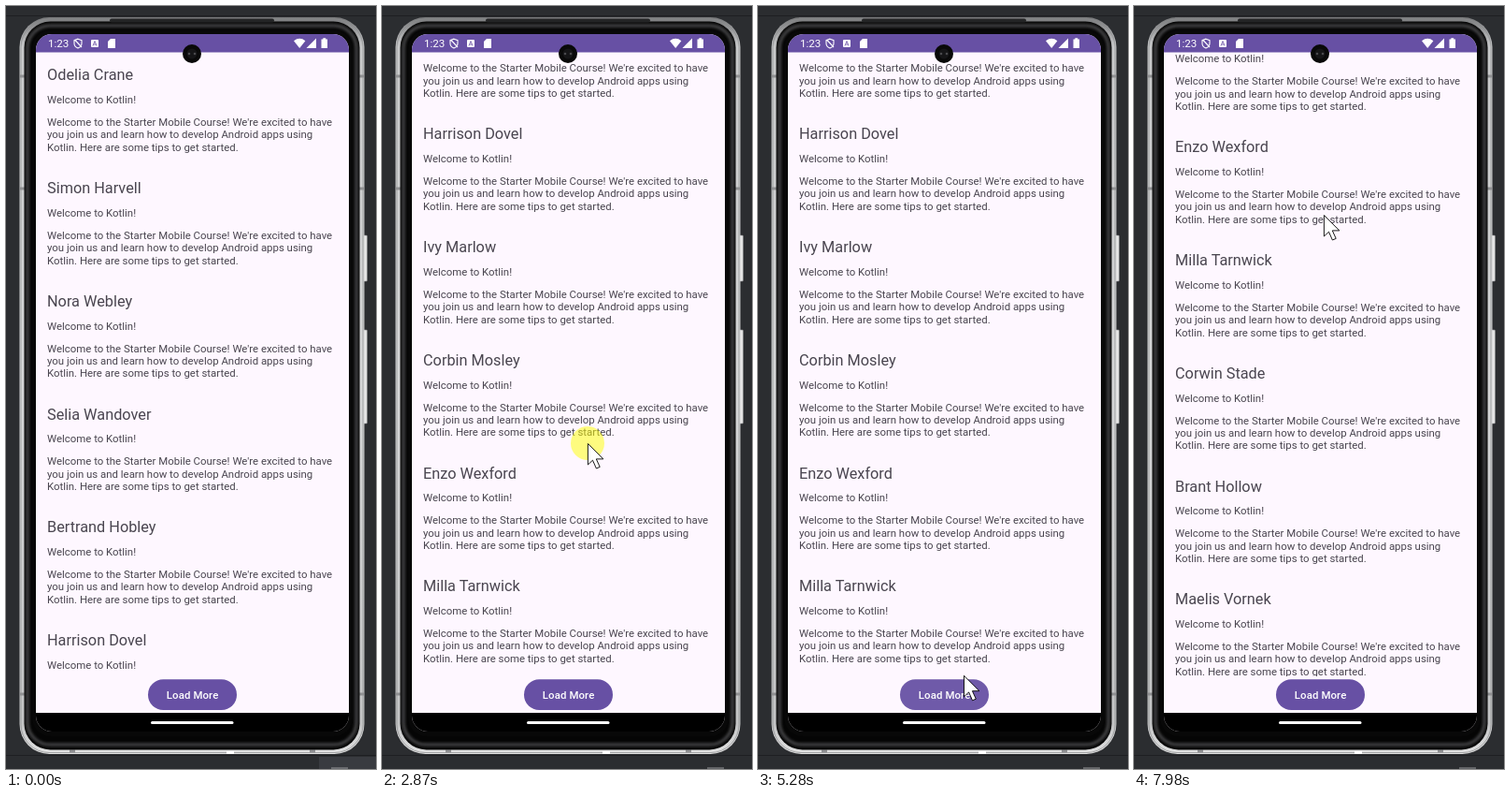
Recreate the animation shown at these times as an HTML page. Size 396x815 px, loop 8000 ms.

```html
<!DOCTYPE html>
<html lang="en">
<head>
<meta charset="utf-8">
<title>Paged list</title>
<style>
  html, body { margin: 0; width: 100%; height: 100%; overflow: hidden; background: #2b2d30; }
  svg { display: block; width: 396px; height: 815px; font-family: Roboto, sans-serif; }
  .list { font-size: 11.41px; fill: #49454f; }
  .name { font-size: 16.3px; }
</style>
</head>
<body>
<svg viewBox="0 0 396 815">
  <defs>
    <clipPath id="view"><rect x="32" y="49" width="335" height="667"/></clipPath>
    <clipPath id="screen"><rect x="32" y="30" width="335" height="745" rx="17"/></clipPath>
    <linearGradient id="metal" x2="0" y2="1">
      <stop offset="0" stop-color="#77787a"/>
      <stop offset=".04" stop-color="#c9cacb"/>
      <stop offset=".5" stop-color="#d6d7d8"/>
      <stop offset=".96" stop-color="#c4c5c6"/>
      <stop offset="1" stop-color="#e2e2e2"/>
    </linearGradient>
    <filter id="soft"><feGaussianBlur stdDeviation="1.6"/></filter>
  </defs>

  <!-- window behind the phone -->
  <path d="M0 10.5H396M0 800.5H396" stroke="#1e1f22"/>
  <rect id="tab" x="335" y="802" width="61" height="13" fill="#393b40"/>
  <path d="M348 814H366" stroke="#9a9b9e"/>

  <!-- phone body -->
  <g fill="#e4e4e4" stroke="#8b8c8e" stroke-width=".6">
    <rect x="382" y="245" width="4.5" height="49" rx="1"/>
    <rect x="382" y="346" width="4.5" height="100" rx="1"/>
  </g>
  <rect x="14.5" y="12" width="369" height="787" rx="32" fill="url(#metal)"/>
  <rect x="16" y="14" width="366" height="783.5" rx="30" fill="none" stroke="#8c8d8f" stroke-width=".7"/>
  <path d="M15 75H20M15 195H20M378 75H383M378 195H383M15 735H20M378 735H383M68 796H74M325 796H331" stroke="#8f9092" stroke-width="3"/>
  <path d="M236 797.5H244" stroke="#fff" stroke-width="3"/>
  <rect x="19.5" y="16.5" width="359" height="778" rx="28" fill="#050505"/>
  <rect x="23" y="21" width="352" height="768" rx="24" fill="none" stroke="#4a4a4c" stroke-width="3" filter="url(#soft)"/>
  <rect x="28" y="26" width="343" height="754" rx="20" fill="#080808"/>
  <rect x="111" y="13.5" width="176" height="4" rx="2" fill="#242526"/>

  <!-- screen -->
  <g clip-path="url(#screen)">
    <rect x="32" y="30" width="335" height="745" fill="#fef7ff"/>
    <g clip-path="url(#view)"><g id="list" class="list"></g></g>
    <rect x="32" y="30" width="335" height="19.5" fill="#6750a4"/>
    <rect x="32" y="755" width="335" height="20" fill="#000"/>
  </g>
  <rect x="155" y="764" width="88.5" height="3" rx="1.5" fill="#fff"/>

  <!-- status bar -->
  <g fill="#fff">
    <text x="45" y="44" font-size="11.6">1:23</text>
    <path d="M77 35.2L81 36.7V40Q81 43.4 77 45Q73 43.4 73 40V36.7ZM73.5 36L81 44" fill="none" stroke="#fff" stroke-width="1.1"/>
    <rect x="91" y="36" width="8" height="8" rx="1"/>
    <path d="M93 42.5L95 37.5L97 42.5M93.8 41H96.2" fill="none" stroke="#6750a4" stroke-width=".8"/>
    <path d="M112 35H117V45H109V38Z"/>
    <path d="M308 37.3Q314.2 32.4 320.4 37.3L314.2 45Z"/>
    <path d="M332 34.5V45H321.5Z"/>
    <path d="M337.5 35.5H339.3V34.3H342.2V35.5H344V45H337.5Z"/>
  </g>
  <circle cx="199" cy="51" r="10" fill="#090909"/>
  <circle cx="199" cy="51" r="5.5" fill="#151517"/>
  <g fill="#4a4a4d"><circle cx="196" cy="51" r="1.3"/><circle cx="202" cy="51" r="1.3"/></g>

  <!-- button -->
  <rect x="152" y="719.3" width="95" height="32.7" rx="16.35" fill="#6750a4"/>
  <rect id="ripple" x="152" y="719.3" width="95" height="32.7" rx="16.35" fill="#fff"/>
  <text x="199.6" y="740" text-anchor="middle" font-size="11.41" font-weight="500" letter-spacing=".1" fill="#fff">Load More</text>

  <g id="cursor">
    <circle id="press" r="18" fill="#ff0"/>
    <path d="M.4 .5V23L5.5 18.2L9.4 27L13.2 25.4L9.3 16.9H16.8Z" fill="#fff" stroke="#000" stroke-width=".9"/>
  </g>
</svg>
<script>
const LOOP = 8000, PITCH = 120.75;
const $ = id => document.getElementById(id);
const names = ["Odelia Crane", "Simon Harvell", "Nora Webley", "Selia Wandover",
  "Bertrand Hobley", "Harrison Dovel", "Ivy Marlow", "Corbin Mosley", "Enzo Wexford",
  "Milla Tarnwick", "Corwin Stade", "Brant Hollow", "Maelis Vornek"];
const body = [
  [104, "Welcome to Kotlin!"],
  [128, "Welcome to the Starter Mobile Course! We're excited to have"],
  [141.4, "you join us and learn how to develop Android apps using"],
  [154.8, "Kotlin. Here are some tips to get started."]
];
const line = (y, text, cls = "") => `<text class="${cls}" x="44" y="${y}">${text}</text>`;
$("list").innerHTML = names.map((name, i) =>
  line(79.3 + i * PITCH, name, "name") +
  body.map(([y, text]) => line(y + i * PITCH, text)).join("")).join("");

// Tracks: [time, ...values]
const scroll = [[0, 0], [1600, 0], [1870, 295], [1940, 295], [2010, 300.25], [2580, 300.25],
  [2860, 540.75], [3010, 540.75], [3250, 547], [3700, 540.75], [7030, 540.75],
  [7790, 880], [7850, 880], [7980, 889]];
const pointer = [[180, 313, 657], [650, 204, 300], [1130, 204, 300], [1400, 207, 356],
  [1600, 208, 311], [1900, 203, 50], [2150, 196, 5], [2540, 226, 689], [2870, 220, 467],
  [3010, 217, 440], [3400, 199, 4], [3480, 196, 4], [3760, 189, 217], [3830, 192, 240],
  [4040, 235, 741], [4520, 222, 733], [5140, 222, 733], [5820, 205, 569],
  [6690, 205, 569], [6890, 203, 576], [7030, 203, 576], [7790, 203, 223]];
const presses = [[1200, 1900], [2560, 3440], [4650, 4860], [7030, 7790]];

function at(track, t) {
  const i = track.findIndex(key => key[0] > t);
  if (i < 0) return track[track.length - 1].slice(1);
  if (i === 0) return track[0].slice(1);
  const a = track[i - 1], b = track[i];
  const p = (t - a[0]) / (b[0] - a[0]), e = p * p * (3 - 2 * p);
  return a.slice(1).map((v, k) => v + (b[k + 1] - v) * e);
}
const within = (t, a, b) => t >= a && t < b;
const clamp = v => Math.max(0, Math.min(1, v));

function draw(now) {
  const t = now % LOOP;
  $("list").setAttribute("transform", `translate(0 ${-at(scroll, t)[0]})`);
  $("cursor").setAttribute("transform", `translate(${at(pointer, t).join(" ")})`);
  $("cursor").style.display = within(t, 180, 1900) || t > 2200 ? "" : "none";
  $("press").style.opacity = presses.some(([a, b]) => within(t, a, b)) ? .5 : 0;
  $("ripple").style.opacity = .12 * clamp((t - 4650) / 140) * clamp((5400 - t) / 260);
  $("tab").style.display = t < 180 ? "" : "none";
  requestAnimationFrame(draw);
}
requestAnimationFrame(draw);
</script>
</body>
</html>
```
